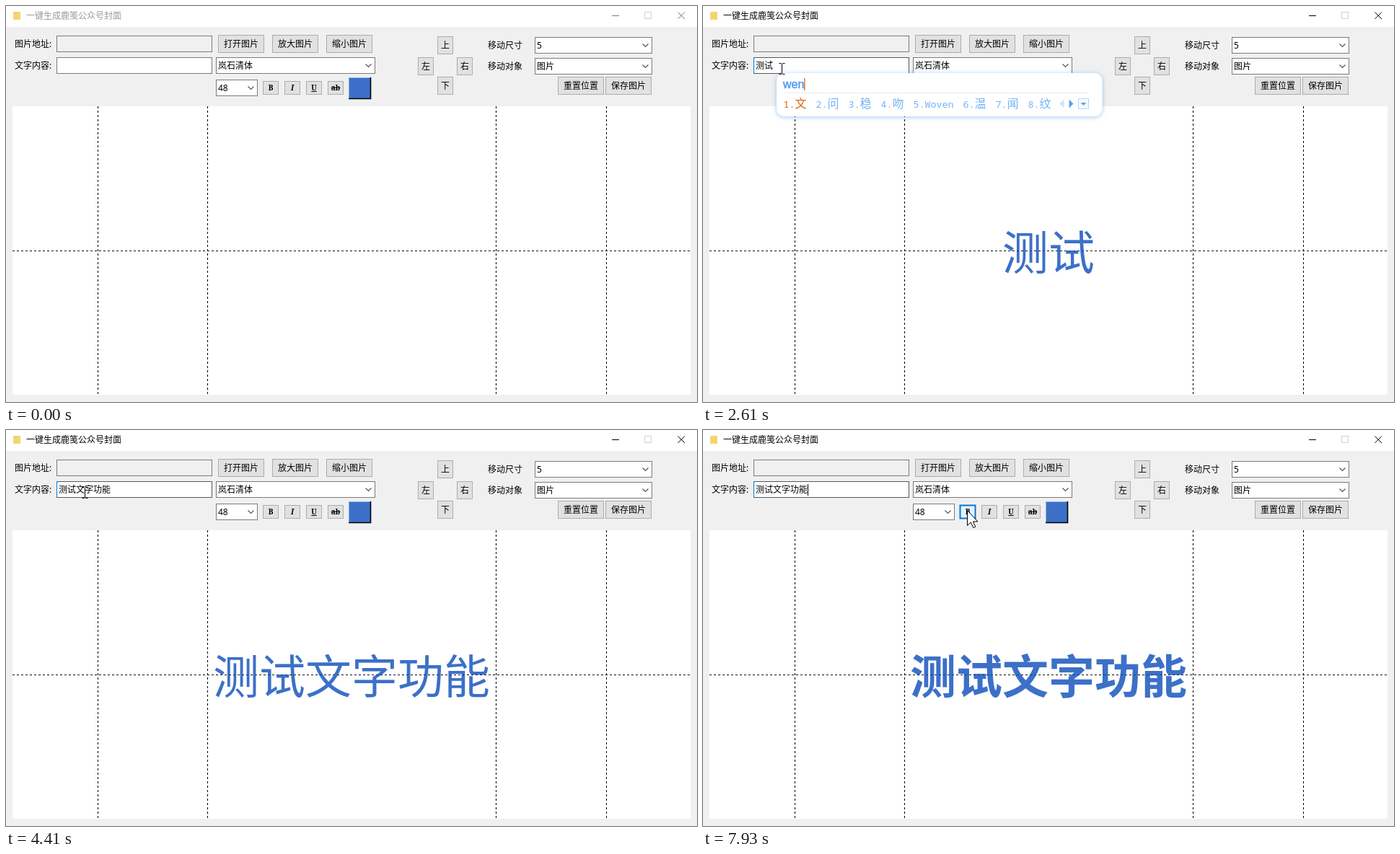
Animation of 958 by 549 pixels, one loop 8 s. Source, as an HTML page:

```html
<!DOCTYPE html>
<html lang="zh-CN">
<head>
<meta charset="utf-8">
<title>封面工具</title>
<style>
html, body { margin: 0; width: 100%; height: 100%; overflow: hidden; background: #f0f0f0; }
svg { display: block; width: 958px; height: 549px; }
text { font-family: "Noto Sans", "Noto Sans CJK SC", "Noto Sans CJK", sans-serif; font-size: 12px; white-space: pre; }
.tool { font: bold 10px "Noto Serif", serif; text-anchor: middle; }
.typed { font: 16px "Liberation Sans", sans-serif; fill: #4a9cf0; stroke: #4a9cf0; stroke-width: .45px; }
.cand { font: 300 16px "Noto Sans CJK SC", "Noto Sans CJK", sans-serif; }
.cand .latin { font: 13.33px "Noto Sans Mono", monospace; }
#popup { filter: drop-shadow(0 1px 3px rgba(50, 130, 225, .45)); }
#cover { font-size: 64px; text-anchor: middle; fill: rgb(11, 76, 186); fill-opacity: .8; }
</style>
</head>
<body>
<svg id="stage" viewBox="0 0 958 549" xmlns="http://www.w3.org/2000/svg"></svg>
<script>
const LOOP = 8000;
const stage = document.getElementById('stage');

const rect = (x, y, w, h, fill, stroke = 'none', extra = '') =>
  `<rect x="${x}" y="${y}" width="${w}" height="${h}" fill="${fill}" stroke="${stroke}" ${extra}/>`;
const box = (x, y, w, h, fill, stroke, extra) => rect(x + .5, y + .5, w - 1, h - 1, fill, stroke, extra);
const label = (x, y, text, extra = '') => `<text x="${x}" y="${y}" ${extra}>${text}</text>`;
const path = (d, stroke, extra = '') => `<path d="${d}" fill="none" stroke="${stroke}" ${extra}/>`;

const button = (x, y, w, text) =>
  box(x, y, w, 25, '#e1e1e1', '#adadad') + label(x + w / 2, y + 17, text, 'text-anchor="middle"');
const combo = (x, y, w, text) =>
  box(x, y, w, 23, '#fff', '#7a7a7a') + label(x + 3, y + 16, text) +
  path(`M${x + w - 13.5} ${y + 9.5}l4 4l4 -4`, '#555', 'stroke-width="1.2"');
const tool = (x, text, id = '', style = '') =>
  box(x, 104, 22, 19, '#e1e1e1', '#adadad', id) + label(x + 11, 117, text, `class="tool" style="${style}"`);
const dashes = d => path(d, '#000', 'stroke-dasharray="3 3" shape-rendering="crispEdges"');

stage.innerHTML =
  rect(0, 0, 958, 549, '#f0f0f0') + rect(0, 0, 958, 29, '#fff') +
  rect(10, 8, 10, 11, '#f2d573') +
  `<g id="title">${label(28, 18, '一键生成鹿笺公众号封面')}</g>` +
  path('M840 13.5h10M931.5 8.5l9.5 9.5m0 -9.5l-9.5 9.5', '#000', 'id="controls"') +
  box(885, 8, 10, 10, 'none', '#d0d0d0') +
  label(12, 57, '图片地址:') + label(12, 87, '文字内容:') +
  box(70, 41, 216, 23, '#f0f0f0', '#7a7a7a') +
  box(70, 71, 216, 23, '#fff', '#7a7a7a', 'id="field"') +
  path('M70.5 71v23', '#0078d7', 'id="focus"') +
  button(294, 40, 64, '打开图片') + button(369, 40, 64, '放大图片') + button(444, 40, 64, '缩小图片') +
  combo(291, 71, 221, '岚石清体') + combo(291, 102, 58, '48') +
  tool(356, 'B', 'id="bold"') + tool(386, 'I', '', 'font-style:italic') +
  tool(416, 'U', '', 'text-decoration:underline') + tool(446, 'ab', '', 'text-decoration:line-through') +
  rect(475, 99, 31, 30, '#3c70c8') + path('M475.5 128V99.5H505', '#8fb0e6') +
  path('M475 128.5H505.5V99', '#000', 'stroke-width="1.6"') +
  button(598, 42, 22, '上') + button(571, 71, 22, '左') + button(625, 71, 22, '右') + button(598, 98, 22, '下') +
  label(668, 59, '移动尺寸') + label(668, 88, '移动对象') +
  combo(733, 43, 163, '5') + combo(733, 72, 163, '图片') +
  button(765, 98, 64, '重置位置') + button(831, 98, 64, '保存图片') +
  rect(9, 139, 940, 400, '#fff') +
  dashes('M9 339.5H949') + [127.5, 279.5, 679.5, 832.5].map(x => dashes(`M${x} 139V539`)).join('') +
  label(479, 365, '', 'id="cover"') + label(73, 87, '', 'id="content"') +
  path('M0 75V91', '#000', 'id="caret"') +
  '<g id="popup"></g>' +
  '<circle id="click" r="11.5" fill="#e8f000" fill-opacity=".5"/>' +
  path('M-4 -7.5h3l1 1l1 -1h3M0 -6.5v13M-4 7.5h3l1 -1l1 1h3', '#000', 'id="beam"') +
  '<path id="arrow" d="M.5 .5V21.5L5.3 17L8.8 24.5L11.8 23.2L8.4 16H15Z" fill="#fff" stroke="#000"/>';

const el = Object.fromEntries([...stage.querySelectorAll('[id]')].map(e => [e.id, e]));
const show = (e, on) => e.setAttribute('visibility', on ? 'visible' : 'hidden');
const set = (e, attrs) => { for (const k in attrs) e.setAttribute(k, attrs[k]); };
const latest = (list, t) => list.filter(item => item[0] <= t).pop();
const within = (spans, t) => spans.some(([from, to]) => t >= from && t < to);

const commits = [[0, ''], [2330, '测试'], [3250, '测试文字'], [4410, '测试文字功能']];
// [time, typed letters, candidates]; no letters closes the popup
const input = [
  [0],
  [1530, 'c', '才 从 此 次 出 成 错 曾'],
  [1600, 'ce', '测 侧 策 册 厕 恻 测 侧'],
  [1820, "ce's", '测试 侧视 测速 测算 测试版 测试员 测试题 厕所'],
  [1890, "ce'sh", '测试 侧视 侧身 测试版 测试员 测试题 策士 侧室'],
  [1970, "ce'shi", '测试 侧视 策士 测试版 测试员 测试题 测时 侧室'],
  [2060],
  [2400, 'w', '我 我们 为 无 www 问 完 为了'],
  [2540, 'we', '为 位 未 我们 为了 www 味 喂'],
  [2610, 'wen', '文 问 稳 吻 Woven 温 闻 纹'],
  [2760, "wen'z", '文字 蚊子 文章 问责 稳重 温州 文中 问住'],
  [2840, "wen'zi", '文字 蚊子 文子 问自 吻字 温姿 闻自 稳字'],
  [3000],
  [3340, 'g', '个 过 给 高 公 国 跟 该'],
  [3420, 'go', '公 狗 够 工 公司 共 公里 购'],
  [3590, 'gong', '公 工 共 供 公司 宫 工作 功'],
  [3760, "gong'n", '功能 供暖 公牛 供你 供您 工农 宫内 宫女'],
  [3830, "gong'ne", '功能 宫内 供呢 公呢 共呢 工呢 功呢 弓内'],
  [3910, "gong'nen", '功能 供能 公能 功能性 共能 工能'],
  [3980, "gong'neng", '功能 供能 公能 功能性 共能 工能'],
  [4210]
];
const caretSpans = [[910, 1530], [2060, 2610], [2920, 3980], [4680, 5220], [5750, 6290], [6820, 7350], [7880, LOOP]];
const pressSpans = [[5600, 5680], [6460, 6610], [7230, 7380]];
const boldSpans = [[5680, 6610], [7380, LOOP]];
const moves = [
  [830, 109, 87], [4680, 140, 95], [4750, 165, 95], [4910, 300, 106], [4990, 440, 111],
  [5060, 483, 111], [5220, 450, 110], [5300, 400, 109], [5370, 368, 109], [5450, 370, 111],
  [5600, 369, 112], [6290, 374, 113], [6460, 370, 113], [6840, 368, 112], [7380, 366, 111]
];

function pointer(t) {
  if (t >= 830) return latest(moves, t).slice(1);
  const u = Math.floor((t - 70) / 76) / 10;
  const curve = (a, b, c) => a * (1 - u) ** 2 + 2 * b * u * (1 - u) + c * u * u;
  return [curve(639, -220, 109), curve(519, 200, 87)];
}

function popupMarkup(left, typed, words, caretColor) {
  let x = left + 9.5;
  const items = words.split(' ').map((word, i) => {
    const latin = /^\w+$/.test(word);
    const body = latin ? `<tspan class="latin">${i + 1}.${word}</tspan>`
                       : `<tspan class="latin">${i + 1}.</tspan>${word}`;
    const item = label(x, 141, body, `class="cand" fill="${i ? '#72b3f5' : '#e0640c'}"`);
    x += 29 + word.length * (latin ? 8 : 16);
    return item;
  }).join('');
  const end = x - 13;
  return rect(left, 93, end + 71 - left, 60, '#fff', 'none', 'rx="10"') +
    label(left + 9, 114, `${typed}<tspan id="mark"></tspan>`, 'class="typed"') +
    path('M0 100V117', caretColor, 'class="mark" stroke-width="1.3"') +
    path(`M${left + 9} 120.5H${end + 52}`, '#e6f0fb') + items +
    `<path d="M${end + 18} 129.5v12l-6 -6z" fill="#cfe4fb"/><path d="M${end + 25} 129.5v12l6 -6z" fill="#5ba3ee"/>` +
    box(Math.round(end) + 37, 128, 15, 15, '#f5faff', '#b5d6f8') +
    `<path d="M${Math.round(end) + 40.5} 134h8l-4 4z" fill="#5ba3ee"/>`;
}

let openPopup = null;
function drawPopup(state, left) {
  if (state === openPopup) return;
  openPopup = state;
  const [time, typed, words] = state;
  el.popup.innerHTML = typed ? popupMarkup(left, typed, words, time < 3000 ? '#e0640c' : '#3a7fd0') : '';
  if (!typed) return;
  const width = el.popup.querySelector('.typed').getComputedTextLength();
  el.popup.querySelector('.mark').setAttribute('transform', `translate(${left + 9.5 + width} 0)`);
}

function render(t) {
  const active = t >= 910;
  set(el.title, { fill: active ? '#000' : '#999' });
  set(el.controls, { stroke: active ? '#000' : '#777' });
  set(el.field, { stroke: active ? '#505a64' : t >= 830 ? '#333' : '#7a7a7a' });
  show(el.focus, active);

  const content = latest(commits, t)[1];
  const caretX = 73 + 12 * content.length;
  el.content.textContent = content;
  el.cover.textContent = content;
  set(el.cover, { 'font-weight': within(boldSpans, t) ? 700 : 400 });
  set(el.caret, { transform: `translate(${caretX + .5} 0)` });
  show(el.caret, within(caretSpans, t));
  drawPopup(latest(input, t), caretX + 5);

  const [x, y] = pointer(t);
  const inField = x >= 70 && x < 286 && y >= 71 && y < 94;
  const place = { transform: `translate(${Math.round(x)} ${Math.round(y)})` };
  set(el.arrow, place);
  set(el.beam, { transform: `translate(${Math.round(x) + .5} ${Math.round(y)})` });
  set(el.click, place);
  show(el.arrow, t >= 70 && !inField);
  show(el.beam, t >= 70 && inField);

  const pressed = within(pressSpans, t);
  const hover = x >= 356 && x < 378 && y >= 104 && y < 123;
  show(el.click, pressed);
  set(el.bold, {
    fill: pressed ? '#cce4f7' : hover ? '#e5f1fb' : '#e1e1e1',
    stroke: pressed ? '#005499' : hover ? '#0078d7' : '#adadad',
    'stroke-width': t >= 5600 ? 2 : 1
  });
}

const start = performance.now();
function tick() {
  render((performance.now() - start) % LOOP);
  requestAnimationFrame(tick);
}
tick();
</script>
</body>
</html>
```
